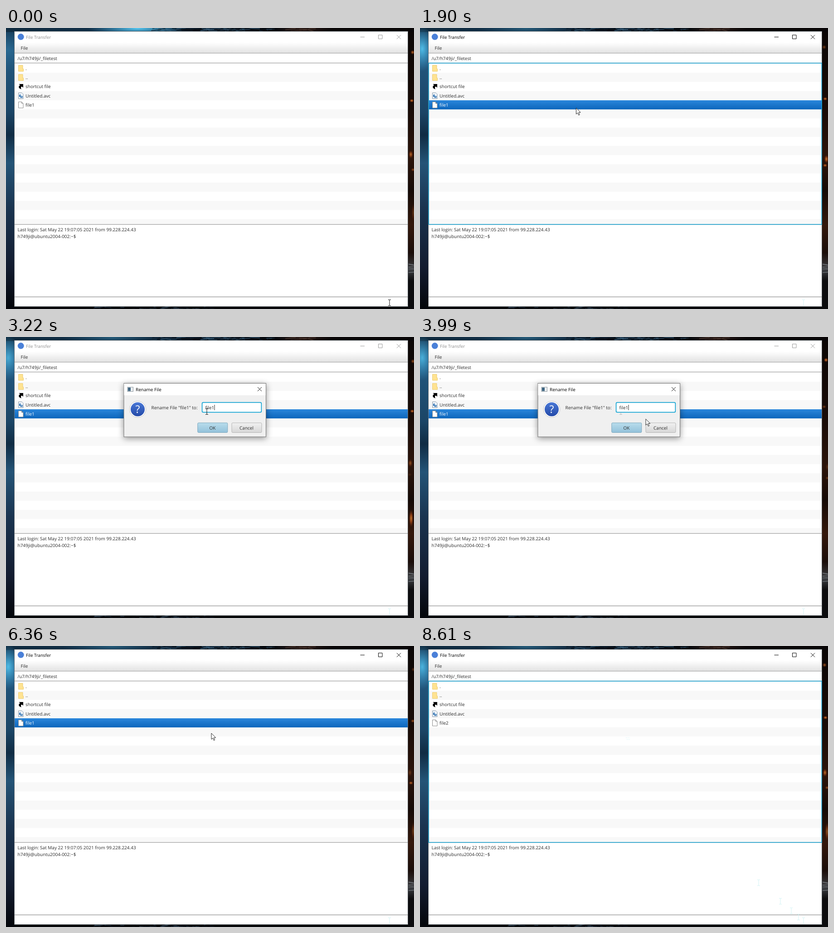
These frames come from a looping animation (900x622 px, 8.68 s). An HTML page:

```html
<!DOCTYPE html>
<html lang="en">
<head>
<meta charset="utf-8">
<title>File Transfer</title>
<style>
  html, body { margin: 0; width: 100%; height: 100%; overflow: hidden; background: #05070a; }
  svg { display: block; width: 900px; height: 622px; }
  text { font: 10px "Open Sans", "Noto Sans", sans-serif; fill: #2b2b2b; text-rendering: geometricPrecision; white-space: pre; }
  .title { font-size: 9.7px; }
  .on { fill: #fff; }
  #dialog { filter: drop-shadow(0 3px 7px rgba(0, 0, 0, .42)); }
</style>
</head>
<body>
<svg viewBox="0 0 900 622">
  <defs>
    <linearGradient id="sky" x2="0" y2="1">
      <stop stop-color="#163a55"/><stop offset=".08" stop-color="#235a82"/>
      <stop offset=".3" stop-color="#1b4566"/><stop offset=".38" stop-color="#102c44"/>
      <stop offset=".48" stop-color="#245477"/><stop offset=".64" stop-color="#1a3450"/>
      <stop offset=".85" stop-color="#131c30"/><stop offset="1" stop-color="#04060a"/>
    </linearGradient>
    <linearGradient id="ember" x2="0" y2="1">
      <stop stop-color="#0a0605"/><stop offset=".3" stop-color="#1a0c07"/>
      <stop offset=".46" stop-color="#2c140a"/><stop offset=".58" stop-color="#150a06"/>
      <stop offset=".7" stop-color="#34180c"/><stop offset=".8" stop-color="#1a0d09"/>
      <stop offset=".86" stop-color="#3a3c40"/><stop offset=".9" stop-color="#0c0c0e"/>
    </linearGradient>
    <linearGradient id="top">
      <stop stop-color="#0f2a3e"/><stop offset=".26" stop-color="#123049"/>
      <stop offset=".5" stop-color="#101c29"/><stop offset=".66" stop-color="#080a0e"/>
      <stop offset=".72" stop-color="#2b1c18"/><stop offset=".8" stop-color="#080506"/>
    </linearGradient>
    <radialGradient id="cyan"><stop stop-color="#55c8f2"/><stop offset="1" stop-color="#3fa3d8" stop-opacity="0"/></radialGradient>
    <radialGradient id="fire"><stop stop-color="#ffb04a"/><stop offset=".4" stop-color="#c0561c"/><stop offset="1" stop-color="#70280a" stop-opacity="0"/></radialGradient>
    <linearGradient id="menu" x2="0" y2="1"><stop stop-color="#fff"/><stop offset="1" stop-color="#e2e2e2"/></linearGradient>
    <linearGradient id="pick" x2="0" y2="1"><stop stop-color="#2a86db"/><stop offset="1" stop-color="#0d66bc"/></linearGradient>
    <linearGradient id="blueBtn" x2="0" y2="1"><stop stop-color="#b9ddec"/><stop offset="1" stop-color="#93c1da"/></linearGradient>
    <linearGradient id="greyBtn" x2="0" y2="1"><stop stop-color="#f1f1f1"/><stop offset="1" stop-color="#d7d7d7"/></linearGradient>
    <linearGradient id="ask" x2="0" y2="1"><stop stop-color="#4a78d6"/><stop offset="1" stop-color="#2349a8"/></linearGradient>
    <path id="beam" d="M-3-6.5H-.8L0-6L.8-6.5H3M0-6V6M-3 6.5H-.8L0 6L.8 6.5H3" fill="none"/>
    <path id="page" d="M27.5 163.5h7l3.5 3.5v10h-10.5zM34.5 163.5v3.5H38" fill="#fff" stroke="#8a8a8a"/>
    <path id="folder" d="M27.500 82.500h9.500v8h1.500v5.500h-11z" fill="#ffe391" stroke="#e8c562" stroke-width=".8"/>
  </defs>

  <g id="wall">
    <rect width="900" height="622" fill="#05070a"/>
    <rect width="20" height="622" fill="url(#sky)"/>
    <rect x="886" width="14" height="622" fill="url(#ember)"/>
    <rect width="900" height="9" fill="url(#top)"/>
    <ellipse id="glowTop" cx="290" cy="1" rx="110" ry="16" fill="url(#cyan)"/>
    <ellipse id="glowLeft" cx="5" cy="46" rx="26" ry="50" fill="url(#cyan)"/>
    <g id="streaks"></g>
    <g id="sparks"></g>
  </g>

  <rect x="18.500" y="7.500" width="868" height="609" fill="#fff" stroke="#6d7478"/>
  <circle cx="32.700" cy="19.600" r="7" fill="#4a80d8"/>
  <text id="caption" class="title" x="44" y="23.600">File Transfer</text>
  <path id="controls" d="M781.500 20h9.500M821.500 15.500h8.500v8.500h-8.500zM862 15.500l9 9M871 15.500l-9 9" fill="none"/>
  <rect x="19" y="32" width="867" height="23.500" fill="url(#menu)"/>
  <path d="M19 55.700H886" stroke="#a9a9a9" stroke-width="1.300"/>
  <text x="32.500" y="48.300">File</text>
  <text x="25.500" y="70.500">/u7/h749ji/_filetest</text>
  <g id="rows"></g>
  <rect id="pickRow" x="19" y="160" width="867" height="20.200" fill="url(#pick)"/>
  <use href="#folder"/><use href="#folder" y="20.250"/>
  <path d="M28.500 124h9.500v8l-2.900-2.500c-2.600 1.200-2.700 3.400-1.100 6.300c-7-2.200-7.300-6.800-2.900-9.300z" fill="#000"/>
  <path d="M27.500 143.500h7.500l3 3v10h-10.500z" fill="#f4f8fc" stroke="#8496a8"/>
  <path d="M29 147.500h4v3h3.500v4h-5v-2h-2.500z" fill="#2f6fae"/>
  <path d="M31 149.500h3M32 152h3" stroke="#d8ecfa"/>
  <use href="#page"/>
  <text x="43" y="93">.</text>
  <text x="43" y="113.300">..</text>
  <text x="43" y="133.300">shortcut file</text>
  <text x="43" y="153.500">Untitled.avc</text>
  <text id="file" x="43" y="173.800">file1</text>
  <path d="M19 77.500H886M19 434.700H886M19 595H886" stroke="#acacac" stroke-width="1.400"/>
  <path d="M19 596.500H886" stroke="#ececec"/>
  <rect id="focus" x="19.200" y="77.700" width="867" height="357" fill="none" stroke="#13a0d0" stroke-width="1.500"/>
  <text x="25.500" y="450">Last login: Sat May 22 19:07:05 2021 from 99.228.224.43</text>
  <text x="25.500" y="465">h749ji@ubuntu2004-002:~$</text>
  <g id="trail" stroke="#d3f3f5"></g>

  <g id="dialog">
    <rect x="260" y="102.500" width="313.500" height="118.500" fill="#f0f0f0" stroke="#717171"/>
    <rect x="260.500" y="103" width="312.500" height="26" fill="#fff"/>
    <rect x="268" y="111" width="12.500" height="9.500" fill="#eef1f3" stroke="#8c969e"/>
    <rect x="269" y="112" width="6" height="7.500" fill="#3f6682"/>
    <text x="286" y="119.800" style="fill:#000">Rename File</text>
    <path d="M555 111l9 9M564 111l-9 9" stroke="#111"/>
    <circle cx="290.500" cy="160" r="18" fill="#fff" stroke="#c4c4c4"/>
    <circle cx="290.500" cy="160" r="15.500" fill="url(#ask)"/>
    <text class="on" x="290.500" y="168" text-anchor="middle" style="font-size:23px">?</text>
    <text x="320.500" y="159.700">Rename File "file1" to:</text>
    <rect x="431.500" y="143.800" width="133" height="24" rx="3.500" fill="#9adcf0"/>
    <rect x="432.700" y="145" width="130.600" height="21.600" rx="2.500" fill="#fff" stroke="#0f9fce" stroke-width="1.500"/>
    <rect id="marked" x="438.500" y="148.500" width="21.500" height="14.500" fill="#0096c9"/>
    <text id="entry" x="439.500" y="159.700"></text>
    <path id="caret" d="M460 150v12" stroke="#222"/>
    <rect x="422.800" y="190" width="66" height="21.500" rx="2" fill="url(#blueBtn)" stroke="#7ba6bc"/>
    <rect x="498" y="190" width="66" height="21.500" rx="2" fill="url(#greyBtn)" stroke="#b4b4b4"/>
    <text x="455.500" y="204.700" text-anchor="middle">OK</text>
    <text x="530.500" y="204.700" text-anchor="middle">Cancel</text>
    <path id="fieldTrail" d="M443 167v4M440 171.500h6" stroke="#bcbcbc"/>
  </g>

  <circle id="click" cx="284.300" cy="174" r="10.500" fill="#c5d234" opacity=".68"/>
  <g id="pointer">
    <path id="arrow" d="M0 0V13.600L3.200 10.800L5.500 16L7.600 15L5.400 10H9.700Z" fill="#fff" stroke="#111" stroke-width=".9"/>
    <use id="ibeam" href="#beam" stroke="#111"/>
  </g>
</svg>
<script>
const LOOP = 8680;
const $ = id => document.getElementById(id);
const show = (id, on) => $(id).style.display = on ? '' : 'none';
const clamp = v => Math.max(0, Math.min(1, v));
const between = (t, a, b) => t >= a && t < b;
const range = (n, fn) => Array.from({ length: n }, (_, i) => fn(i)).join('');

let seed = 7;
const rnd = () => (seed = seed * 16807 % 2147483647) / 2147483647;

$('rows').innerHTML = range(9, i => {
  const y = 99.1 + i * 40.5;
  return `<rect x="19" y="${y}" width="867" height="${Math.min(20.25, 434.5 - y)}" fill="#f8f8f8"/>`;
});

// Feathery strands along the top and bottom edges of the wallpaper
const strand = (x, y, light) =>
  `<path d="M${x} ${y}l${8 + rnd() * 16} ${rnd() * 8 - 3}" stroke="${light}" stroke-width="${0.6 + rnd() * 1.5}" opacity="${0.4 + rnd() * 0.5}"/>`;
$('streaks').innerHTML =
  range(75, i => strand(320 + rnd() * 270, rnd() * 7, i % 3 ? '#05090e' : '#3b6684')) +
  range(45, i => strand(160 + rnd() * 290, 617 + rnd() * 5, i % 2 ? '#41566a' : '#101820')) +
  range(8, () => strand(614 + rnd() * 60, rnd() * 7, '#4a352d')) +
  range(7, () => strand(888, 522 + rnd() * 22, '#8d949b'));

// Embers: height, size, drift period and phase
const embers = [[285, 9, 2900, 0.7], [405, 20, 2100, 0.1], [48, 5, 3500, 0.3], [160, 4, 1700, 0.5], [308, 4, 4300, 0.2]];
$('sparks').innerHTML = range(embers.length, i => `<ellipse ry="${embers[i][1]}" rx="5" fill="url(#fire)"/>`);

// Cursor stops the pointer leaves behind on the way back
const trail = [[50, 846, 608], [8330, 747, 524], [8400, 795, 565], [8470, 819, 586], [8540, 835, 600]];
$('trail').innerHTML = range(trail.length, i =>
  `<use href="#beam" x="${trail[i][1]}" y="${trail[i][2]}"/>`) +
  '<path d="M454 203h9M456 207h7" stroke-dasharray="2 2"/>';

const route = [
  [0, 846, 608], [300, 846, 608], [900, 285, 175.5], [1250, 285, 175.5],
  [1700, 344.5, 177], [2600, 344.5, 177], [3050, 443, 165], [3350, 443, 165],
  [3750, 498, 181.5], [4200, 498, 181.5], [4700, 515, 183], [5350, 515, 183],
  [5850, 453, 193], [LOOP, 453, 193]
];

function pointerAt(t) {
  const i = route.findIndex(stop => stop[0] > t);
  const [t0, x0, y0] = route[i - 1], [t1, x1, y1] = route[i];
  const p = (t - t0) / (t1 - t0), e = p * p * (3 - 2 * p);
  return [x0 + (x1 - x0) * e, y0 + (y1 - y0) * e];
}

function drawWall(t) {
  const shift = clamp(t / 900);
  $('glowTop').setAttribute('opacity', 1 - 0.72 * shift);
  $('glowTop').setAttribute('cx', 290 - 55 * shift);
  $('glowLeft').setAttribute('opacity', 0.15 + shift * (0.7 + 0.12 * Math.sin(t / 700)));
  [...$('sparks').children].forEach((spark, i) => {
    const [y, , period, phase] = embers[i];
    const p = (t / period + phase) % 1;
    spark.setAttribute('cx', 900 - 10 * p);
    spark.setAttribute('cy', y + 6 * Math.sin(p * 6));
    spark.setAttribute('opacity', 0.75 * Math.sin(Math.PI * p));
  });
}

function draw(t) {
  drawWall(t);

  const dialog = between(t, 1960, 6230);
  const active = t >= 920 && !dialog;
  const picked = between(t, 920, 6760);
  $('caption').style.fill = active ? '#000' : '#8f8f8f';
  $('controls').setAttribute('stroke', active ? '#000' : '#999');
  show('pickRow', picked);
  $('file').setAttribute('class', picked ? 'on' : '');
  $('file').textContent = t < 6760 ? 'file1' : 'file2';
  show('focus', between(t, 920, 1960) || t >= 6760);

  show('dialog', dialog);
  $('dialog').style.opacity = clamp((t - 1930) / 130) * clamp((6260 - t) / 130);
  const marked = t < 3120;
  show('marked', marked);
  $('entry').setAttribute('class', marked ? 'on' : '');
  $('entry').textContent = t < 4480 ? 'file1' : t < 4760 ? 'file' : 'file2';
  show('caret', !marked && (t - 3120) % 1000 < 900 && !between(t, 5150, 5600));
  $('caret').setAttribute('transform', `translate(${between(t, 4480, 4760) ? -5.7 : 0})`);
  show('fieldTrail', t > 3400);

  show('click', between(t, 960, 1180));
  const [x, y] = pointerAt(t);
  const overText = y > 435 || (dialog && x > 432 && x < 498 && y < 168);
  show('pointer', t < 8260);
  show('arrow', !overText);
  show('ibeam', overText);
  $('pointer').setAttribute('transform', `translate(${x} ${y})`);

  const marks = $('trail').children;
  trail.forEach(([from], i) => marks[i].style.display = t >= from ? '' : 'none');
  marks[trail.length].style.display = t >= 8260 ? '' : 'none';
}

const start = performance.now();
function tick() {
  draw((performance.now() - start) % LOOP);
  requestAnimationFrame(tick);
}
tick();
</script>
</body>
</html>
```
